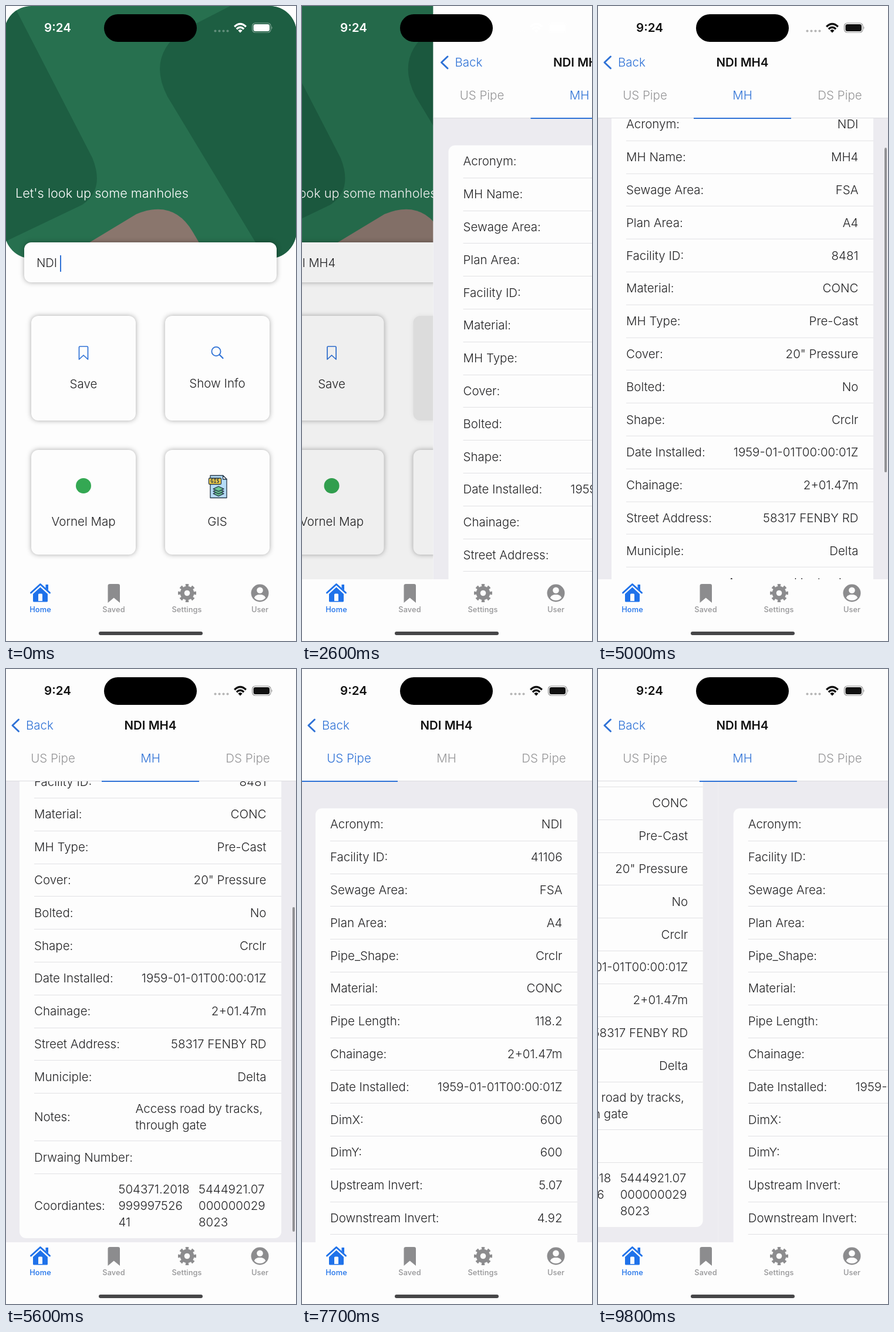
These frames come from a looping animation (494x1080 px, 9900 ms). An HTML page:

```html
<!DOCTYPE html>
<html lang="en">
<head>
<meta charset="utf-8">
<title>Manhole lookup</title>
<style>
@property --push { syntax: "<number>"; inherits: true; initial-value: 0; }
@property --scroll { syntax: "<number>"; inherits: true; initial-value: 0; }
@property --page { syntax: "<number>"; inherits: true; initial-value: 1; }
@property --tab { syntax: "<number>"; inherits: true; initial-value: 1; }

:root { --loop: 9.9s; --blue: #2f72d6; --paper: #fdfdfd; --grey: #959597; }
* { box-sizing: border-box; }
html, body { margin: 0; width: 100%; height: 100%; overflow: hidden; background: var(--paper); }
.stage {
  position: relative; width: 494px; height: 1080px; overflow: hidden; background: var(--paper);
  font: 350 20.5px/28px Inter, "Liberation Sans", sans-serif; color: #232325;
  white-space: nowrap;
  animation: push var(--loop) linear infinite, scroll var(--loop) linear infinite,
    page var(--loop) linear infinite, tab var(--loop) linear infinite;
}
.stage div, .stage svg { position: absolute; }
.mid { transform: translate(-50%, -50%); }
.midy { transform: translateY(-50%); }
svg { left: 0; top: 0; overflow: visible; }

/* home */
.home { inset: 0; transform: translateX(calc(var(--push) * -149.4px)); }
.hero { left: -3px; top: 0; width: 498px; height: 430px; border-radius: 46px 46px 48px 48px; overflow: hidden; background: #27704f; }
.hero svg { left: 3px; }
.hello { left: 16px; top: 318px; font-size: 21.7px; color: #fff; }
.box { background: var(--paper); border-radius: 12px; box-shadow: 0 0 9px rgba(0,0,0,.34); }
.field { left: 31px; top: 402px; width: 430px; height: 68px; padding: 21px; font-size: 20.2px; white-space: pre; }
.key { font-size: 0; animation: key var(--loop) infinite; }
.caret {
  display: inline-block; width: 2px; height: 28px; margin-left: -1px; vertical-align: middle;
  background: var(--blue); animation: caret var(--loop) step-end infinite;
}
.tile { width: 178px; height: 178px; }
.tile .mid { left: 89px; }
.press { animation: press var(--loop) linear infinite; }
.dim { inset: 0 -200px; background: #000; opacity: calc(var(--push) * .1); }

/* detail */
.detail { left: -3px; top: 0; width: 498px; height: 1080px; background: var(--paper); overflow: hidden;
  transform: translateX(calc((1 - var(--push)) * 498px)); }
.nav { inset: 0 0 auto; height: 191px; background: var(--paper); border-bottom: 1px solid #dcdce0; }
.back { left: 37px; top: 96px; color: var(--blue); }
.title { left: 249px; top: 96px; font-weight: 600; color: #111; }
.tabs { left: 0; top: 0; width: 498px; }
.tabs .mid { top: 152px; color: var(--grey); }
.tabs .us { left: 83px; animation: us var(--loop) step-end infinite; }
.tabs .mh { left: 249px; animation: mh var(--loop) step-end infinite; }
.tabs .ds { left: 415px; }
.bar { left: 0; top: 189.5px; width: 166px; height: 2.5px; background: var(--blue);
  transform: translateX(calc(var(--tab) * 166px)); }
.panes { left: 0; top: 191px; width: 498px; height: 784px; transform: translateX(calc(var(--page) * -498px)); }
.pane { top: 0; width: 498px; height: 784px; overflow: hidden; background: #ecebf0; }
.card { left: 26px; top: 46px; width: 446px; padding-left: 25px; border-radius: 11px; background: var(--paper); overflow: hidden; }
.scrolls { transform: translateY(calc(var(--scroll) * -1px)); }
.stage .row { position: relative; height: 55.8px; padding-right: 25.5px; display: flex;
  align-items: center; justify-content: space-between; border-bottom: 1px solid #e1e1e4; }
.stage .row:last-child { border: 0; }
.row .note { width: 223px; }
.row .pair { display: flex; width: 252px; }
.row .pair span { flex: none; width: 136.5px; }
.thumb { left: 490.5px; top: 6px; width: 4px; height: 552px; border-radius: 2px; background: #919194; opacity: 0;
  transform: translateY(calc(var(--scroll) * .702px)); animation: thumb var(--loop) linear infinite; }

/* chrome */
.dock { left: 0; top: 975px; width: 494px; height: 105px; background: var(--paper); }
.dock svg { top: -975px; }
.dock .mid { top: 52px; font-size: 12.8px; font-weight: 500; letter-spacing: .1px; color: var(--grey); }
.grip { left: 158px; top: 88.5px; width: 177px; height: 6px; border-radius: 3px; background: #464648; }
.status { inset: 0 0 auto; height: 62px; color: #fff; animation: ink var(--loop) step-end infinite; }
.clock { left: 88px; top: 37px; font-weight: 600; }
.island { left: 167px; top: 14px; width: 158px; height: 47px; border-radius: 24px; background: #000; }

@keyframes push {
  0%, 24.24% { --push: 0; animation-timing-function: cubic-bezier(.5, 0, .8, .6); }
  26.26% { --push: .544; animation-timing-function: cubic-bezier(.15, .6, .4, 1); }
  30.3%, 100% { --push: 1; }
}
@keyframes scroll {
  0%, 47.47% { --scroll: 0; animation-timing-function: ease-in; }
  50.5% { --scroll: 63; animation-timing-function: cubic-bezier(.25, .5, .45, 1); }
  59.6%, 100% { --scroll: 315; }
}
@keyframes page {
  0%, 70.7% { --page: 1; animation-timing-function: ease-in; }
  72.73% { --page: .55; animation-timing-function: ease-out; }
  75.76%, 90.9% { --page: 0; animation-timing-function: ease-in; }
  92.93% { --page: .5; animation-timing-function: ease-out; }
  95.45%, 96.97% { --page: 1; animation-timing-function: ease-in; }
  98.99% { --page: 1.583; }
  100% { --page: 1.8; }
}
@keyframes tab {
  0%, 72.73% { --tab: 1; animation-timing-function: ease-out; }
  75.76%, 92.5% { --tab: 0; animation-timing-function: ease-out; }
  95.45%, 98.79% { --tab: 1; }
  100% { --tab: 1.36; }
}
@keyframes us { 0% { color: var(--grey); } 72.73% { color: var(--blue); } 92.5%, 100% { color: var(--grey); } }
@keyframes mh { 0% { color: var(--blue); } 72.73% { color: var(--grey); } 92.5%, 100% { color: var(--blue); } }
@keyframes key { from, to { font-size: 20.2px; } }
@keyframes caret { 0% { opacity: 1; } 17.1%, 100% { opacity: 0; } }
@keyframes press {
  0%, 22.5%, 29.5%, 100% { opacity: 1; background: var(--paper); }
  23.5%, 27.3% { opacity: .2; background: #999; }
}
@keyframes thumb { 0%, 47.4% { opacity: 0; } 48.4%, 62.7% { opacity: 1; } 64.6%, 100% { opacity: 0; } }
@keyframes ink { 0% { color: #fff; } 29.2%, 100% { color: #111; } }
</style>
</head>
<body>
<div class="stage">
  <div class="home">
    <div class="hero">
      <svg width="494" height="430">
        <path fill="#1d5e42" d="M-4 -36 L18 8 L147 258 Q169 312 130 338 L-4 402Z"/>
        <path fill="#1d5e42" d="M382 0 L300 42 Q240 86 275 154 L442 430 H500 V0Z"/>
        <path fill="#8a766d" d="M96 430 L222 354 Q285 328 318 384 L345 430Z"/>
      </svg>
    </div>
    <div class="hello midy">Let's look up some manholes</div>
    <div class="box field">NDI <span class="key" style="animation-delay:.4s">M</span><span class="key" style="animation-delay:.7s">H</span><span class="key" style="animation-delay:1.3s">4</span><i class="caret"></i></div>

    <div class="box tile" style="left:43px;top:527px">
      <svg><path d="M83 52h12q1.5 0 1.5 1.5v20.5l-7.5-7-7.5 7V53.5q0-1.5 1.5-1.5z" fill="none" stroke="#2f72d6" stroke-width="1.7" stroke-linejoin="round"/></svg>
      <div class="mid" style="top:116px">Save</div>
    </div>
    <div class="box tile press" style="left:271px;top:527px">
      <svg><g fill="none" stroke="#2f72d6" stroke-linecap="round"><circle cx="87" cy="60.5" r="7.6" stroke-width="1.8"/><path d="M92.8 66.3l5.7 5.7" stroke-width="2.2"/></g></svg>
      <div class="mid" style="top:115px">Show Info</div>
    </div>
    <div class="box tile" style="left:43px;top:755px">
      <svg><circle cx="89" cy="61" r="13" fill="#34a853"/></svg>
      <div class="mid" style="top:122px">Vornel Map</div>
    </div>
    <div class="box tile" style="left:271px;top:755px">
      <svg stroke="#26384a" stroke-width="1.3" stroke-linejoin="round">
        <path d="M77 43.5h21.5l6.5 6.5v31.5H77z" fill="#b5dcf6"/>
        <path d="M98.5 43.5v6.5h6.5z" fill="#fff"/>
        <rect x="74.5" y="48" width="21" height="10.5" rx="1.5" fill="#f6cf45"/>
        <g fill="#6cc592"><path id="leaf" d="M91 70l9 4.3-9 4.3-9-4.3z"/><use href="#leaf" y="-4"/><use href="#leaf" y="-8"/></g>
        <text x="85" y="56.2" text-anchor="middle" font-family="DejaVu Sans Mono, monospace" font-size="8.5" font-weight="700" stroke="none" fill="#26384a">GIS</text>
      </svg>
      <div class="mid" style="top:122px">GIS</div>
    </div>
    <div class="dim"></div>
  </div>

  <div class="detail">
    <div class="panes">
      <div class="pane" style="left:0"><div class="card" data-rows="pipe"></div></div>
      <div class="pane" style="left:498px"><div class="card scrolls" data-rows="hole"></div><div class="thumb"></div></div>
      <div class="pane" style="left:996px"><div class="card" data-rows="pipe"></div></div>
    </div>
    <div class="nav">
      <svg><path d="M24.5 86l-10.5 10 10.5 10" fill="none" stroke="#2f72d6" stroke-width="3" stroke-linecap="round" stroke-linejoin="round"/></svg>
      <div class="back midy">Back</div>
      <div class="title mid">NDI MH4</div>
      <div class="tabs">
        <div class="mid us">US Pipe</div><div class="mid mh">MH</div><div class="mid ds">DS Pipe</div>
      </div>
      <div class="bar"></div>
    </div>
  </div>

  <div class="dock">
    <svg fill="#8c8c8e">
      <g fill="#1f72ea">
        <path d="M42.5 998l16-14.5 16 14.5" fill="none" stroke="#1f72ea" stroke-width="3" stroke-linecap="round" stroke-linejoin="round"/>
        <path d="M67.5 984h4.5v10l-4.5-4zM46 1000l12.5-11.5 12.5 11.5v12q0 1.5-1.5 1.5h-22q-1.5 0-1.5-1.5z"/>
        <path d="M55 1012v-11q0-1.5 1.5-1.5h4q1.5 0 1.5 1.5v11z" fill="#fdfdfd"/>
      </g>
      <path d="M177 983h14q3 0 3 3v29l-10.3-8.5-10.2 8.5v-29q0-3 3.5-3z"/>
      <g fill="none" stroke="#8c8c8e">
        <circle cx="308.5" cy="998.5" r="8.3" stroke-width="7"/>
        <circle cx="308.5" cy="998.5" r="13" stroke-width="5" pathLength="16" stroke-dasharray="1 1" stroke-dashoffset=".5"/>
      </g>
      <circle cx="432.5" cy="998.5" r="15"/>
      <g fill="#fdfdfd"><circle cx="432.5" cy="993.8" r="5.3"/><path d="M422.8 1006.5q2-5.5 9.7-5.5t9.7 5.5q-4 4.5-9.7 4.5t-9.7-4.5z"/></g>
    </svg>
    <div class="mid" style="left:58.5px;color:#1f72ea">Home</div>
    <div class="mid" style="left:183.5px">Saved</div>
    <div class="mid" style="left:308px">Settings</div>
    <div class="mid" style="left:432.5px">User</div>
    <div class="grip"></div>
  </div>

  <div class="status">
    <div class="clock mid">9:24</div>
    <svg fill="currentColor">
      <path d="M356.5 42.5h22" stroke="currentColor" stroke-width="4.2" stroke-linecap="round" stroke-dasharray="0 7" opacity=".3"/>
      <g fill="none" stroke="currentColor" stroke-width="3.3">
        <path d="M389.2 35.2q9.8-9.4 19.6 0"/>
        <path d="M392.8 39.2q6.2-5.8 12.4 0"/>
      </g>
      <path d="M395.3 41.7q3.7-3.2 7.4 0l-3.7 3.8z"/>
      <rect x="419.5" y="29" width="31.5" height="16" rx="5" fill="none" stroke="currentColor" stroke-width="1.2" opacity=".45"/>
      <rect x="421.5" y="31" width="27.5" height="12" rx="3.3"/>
      <path d="M452.5 34.5q2 2.5 0 5z" opacity=".5"/>
    </svg>
  </div>
  <div class="island"></div>
</div>

<script>
const tables = {
  hole: [
    "Acronym|NDI", "MH Name|MH4", "Sewage Area|FSA", "Plan Area|A4", "Facility ID|8481",
    "Material|CONC", "MH Type|Pre-Cast", "Cover|20\" Pressure", "Bolted|No", "Shape|Crclr",
    "Date Installed|1959-01-01T00:00:01Z", "Chainage|2+01.47m", "Street Address|58317 FENBY RD",
    "Municiple|Delta", "Notes|Access road by tracks,<br>through gate|note|81", "Drwaing Number|",
    "Coordiantes|<span>504371.2018<br>999997526<br>41</span><span>5444921.07<br>000000029<br>8023</span>|pair|109",
  ],
  pipe: [
    "Acronym|NDI", "Facility ID|41106", "Sewage Area|FSA", "Plan Area|A4", "Pipe_Shape|Crclr",
    "Material|CONC", "Pipe Length|118.2", "Chainage|2+01.47m", "Date Installed|1959-01-01T00:00:01Z",
    "DimX|600", "DimY|600", "Upstream Invert|5.07", "Downstream Invert|4.92", "|",
  ],
};

const row = line => {
  const [label, value, kind = "", height] = line.split("|");
  const style = height ? ` style="height:${height}px"` : "";
  return `<div class="row"${style}><span>${label && label + ":"}</span><span class="${kind}">${value}</span></div>`;
};

for (const card of document.querySelectorAll("[data-rows]"))
  card.innerHTML = tables[card.dataset.rows].map(row).join("");

// The whole piece advances in steps of a tenth of a second.
const LOOP = 9900, STEP = 100;
const parts = document.getAnimations();
parts.forEach(part => part.pause());

function tick() {
  const time = Math.floor(performance.now() % LOOP / STEP) * STEP;
  for (const part of parts) part.currentTime = time;
  requestAnimationFrame(tick);
}
tick();
</script>
</body>
</html>
```
